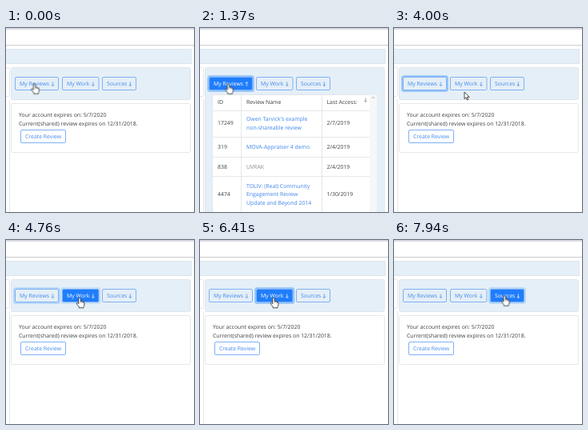
Recreate the animation shown at these times as an HTML page. Size 235 px wide and 230 px high, loop 8 s.

```html
<!DOCTYPE html>
<html lang="en">
<head>
<meta charset="utf-8">
<title>Review list</title>
<style>
@property --on { syntax: "<number>"; inherits: true; initial-value: 0; }
@property --ring { syntax: "<number>"; inherits: true; initial-value: 0; }

html, body { margin: 0; height: 100%; overflow: hidden; background: #fff; }
svg { display: block; width: 100vw; height: 100vh; }
text {
  font: 6.9px "Open Sans", "Noto Sans", sans-serif;
  text-rendering: geometricPrecision;
  fill: #3c4045;
  white-space: pre;
}
.blue text, text.link { fill: #3e84ea; }
.head text { font-size: 5.7px; font-weight: 700; }
text.muted { fill: #858a90; }
.panel { fill: #e5eff7; stroke: #dde6ed; }
.card { fill: #fff; stroke: #e6e7ea; }
.rule { stroke: #e4e7ea; fill: none; }
.tasks .rule { stroke: #dae3ea; }

/* Buttons: --on is the hover fill, --ring the focus glow */
.btn { --blue: #4389ed; color: color-mix(in srgb, #fff calc(var(--on) * 100%), var(--blue)); }
.btn text { fill: currentColor; }
.btn .glow { fill: none; stroke: #8fc1fa; stroke-width: 1.8; stroke-opacity: var(--ring); }
.btn .face { fill: #1f7dfc; fill-opacity: var(--on); stroke: #7fb1f4; }
.arrow { fill: none; stroke: currentColor; stroke-width: .8; }

.btn, .arrow, .scene, .cursor, .cursor g { animation: 8s step-end infinite; }
.reviews { animation-name: hover1, ring1; }
.work { animation-name: hover2, ring2; }
.sources { animation-name: hover3, ring3; }
.reviews .arrow { animation-name: flip1; }
.work .arrow { animation-name: flip2; }
.closed { animation-name: closed; }
.list { opacity: 0; animation-name: list; }
.tasks { opacity: 0; animation-name: tasks; }
.cursor { animation-name: move; }
.cursor .hand { animation-name: hand; }
.cursor .pointer { opacity: 0; animation-name: pointer; }

@keyframes hover1 {
  0% { --on: 0 } .75% { --on: .4 } 1.5% { --on: .8 } 2.25% { --on: 1 }
  48.5% { --on: .6 } 49.25% { --on: .2 } 50%, 100% { --on: 0 }
}
@keyframes hover2 {
  0% { --on: 0 } 51.5% { --on: .4 } 52.25% { --on: .8 } 53% { --on: 1 }
  88.125% { --on: .6 } 88.875% { --on: .2 } 89.625%, 100% { --on: 0 }
}
@keyframes hover3 {
  0% { --on: 0 } 88.875% { --on: .4 } 89.625% { --on: .8 } 90.375%, 100% { --on: 1 }
}
@keyframes ring1 {
  0% { --ring: 0 } 14.75% { --ring: .4 } 15.5% { --ring: 1 }
  59.5% { --ring: .6 } 60.25% { --ring: .2 } 61%, 100% { --ring: 0 }
}
@keyframes ring2 {
  0% { --ring: 0 } 59.5% { --ring: .4 } 60.25% { --ring: .8 } 61% { --ring: 1 }
  98.5% { --ring: .5 } 99.25%, 100% { --ring: 0 }
}
@keyframes ring3 {
  0% { --ring: 0 } 98.5% { --ring: .3 } 99.25%, 100% { --ring: .6 }
}
@keyframes flip1 { 0%, 38.75%, 100% { transform: none } 17.125% { transform: scaleY(-1) } }
@keyframes flip2 { 0%, 80.125%, 100% { transform: none } 61% { transform: scaleY(-1) } }
@keyframes closed { 0%, 38.75%, 80.125%, 100% { opacity: 1 } 17.125%, 61% { opacity: 0 } }
@keyframes list { 0%, 38.75%, 100% { opacity: 0 } 17.125% { opacity: 1 } }
@keyframes tasks { 0%, 80.125%, 100% { opacity: 0 } 61% { opacity: 1 } }
@keyframes hand { 0%, 51.5%, 88.875%, 100% { opacity: 1 } 48.5%, 88.125% { opacity: 0 } }
@keyframes pointer { 0%, 51.5%, 88.875%, 100% { opacity: 0 } 48.5%, 88.125% { opacity: 1 } }
@keyframes move {
  0% { transform: translate(35.5px, 69.5px) }
  47% { transform: translate(38px, 70px) }
  47.75% { transform: translate(49px, 72px) }
  48.5% { transform: translate(70px, 77px) }
  49.25% { transform: translate(82px, 80px) }
  50% { transform: translate(88px, 80px) }
  50.75% { transform: translate(91px, 79px) }
  51.5% { transform: translate(92px, 76px) }
  52.25% { transform: translate(92px, 74px) }
  53% { transform: translate(92px, 73px) }
  53.75% { transform: translate(92px, 72px) }
  85.125% { transform: translate(93px, 72px) }
  85.875% { transform: translate(96px, 73px) }
  86.625% { transform: translate(101px, 73px) }
  87.375% { transform: translate(109px, 73px) }
  88.125% { transform: translate(118px, 73px) }
  88.875% { transform: translate(126px, 73px) }
  89.625% { transform: translate(132px, 72px) }
  90.375% { transform: translate(136px, 71px) }
  91.125% { transform: translate(138px, 70px) }
  91.875%, 100% { transform: translate(138.2px, 69.5px) }
}
</style>
</head>
<body>
<svg viewBox="0 0 235 230">
  <defs>
    <path id="down" d="M0-2.6V2.4M-1.5 .9L0 2.4L1.5 .9"/>
    <g id="account">
      <rect class="card" x="6.5" y="94.5" width="224" height="61" rx="2"/>
      <text x="16" y="111">Your account expires on: 5/7/2020</text>
      <text x="16" y="121.8">Current(shared) review expires on 12/31/2018.</text>
      <g class="btn">
        <rect class="face" x="18.5" y="127.5" width="56" height="16" rx="1.5"/>
        <text x="24" y="138">Create Review</text>
      </g>
    </g>
  </defs>

  <rect width="235" height="230" fill="#fff"/>
  <rect width="235" height="2" fill="#d9d9e3"/>
  <path d="M0 21.5H235" stroke="#cdcdd0"/>
  <rect class="panel" x="-2.5" y="26.5" width="234" height="18"/>
  <path class="rule" d="M0 49.5H3.5Q4.5 49.5 4.5 51V84Q4.5 85.5 3.5 85.5H0M4.5 89V230"/>

  <g class="scene closed">
    <rect class="panel" x="6.5" y="49.5" width="224" height="40" rx="2"/>
    <use href="#account"/>
  </g>

  <g class="scene list">
    <rect class="panel" x="6.5" y="49.5" width="224" height="190" rx="2"/>
    <rect x="15" y="83" width="206" height="147" fill="#fff"/>
    <rect x="212" y="83" width="9" height="147" fill="#f6f7f8"/>
    <path d="M214.8 88L216.5 86.2L218.2 88" fill="none" stroke="#c98b62" stroke-width=".8"/>
    <path class="rule" d="M15 83.5H212M15 103.5H212M15 136.5H212M15 161.5H212M15 185.5H212M15.5 83V230M51.5 83V230M152.5 83V230"/>
    <text x="22" y="95.4">ID</text>
    <text x="58" y="95.4">Review Name</text>
    <text x="158.5" y="95.4">Last Access:</text>
    <use href="#down" x="207" y="90" fill="none" stroke="#6a7077" stroke-width=".7"/>
    <text x="22" y="121.4">17249</text>
    <text class="link" x="58" y="116.4">Owen Tarvick's example</text>
    <text class="link" x="58" y="127">non-shareable review</text>
    <text x="158.5" y="121.4">2/7/2019</text>
    <text x="22" y="150.6">319</text>
    <text class="link" x="58" y="150.6">MOVA-Appraiser 4 demo</text>
    <text x="158.5" y="150.6">2/4/2019</text>
    <text x="22" y="175.6">838</text>
    <text class="muted" x="58" y="175.6">UVRAK</text>
    <text x="158.5" y="175.6">2/4/2019</text>
    <text x="22" y="210.4">4474</text>
    <g class="blue">
      <text x="58" y="199.8">TOLIV: (Real) Community</text>
      <text x="58" y="210.4">Engagement Review</text>
      <text x="58" y="221">Update and Beyond 2014</text>
    </g>
    <text x="158.5" y="210.4">1/30/2019</text>
  </g>

  <g class="scene tasks">
    <rect class="panel" x="6.5" y="49.5" width="224" height="161" rx="2"/>
    <path class="rule" d="M15 83.5H221M15 104.5H221M15 147.5H221"/>
    <g class="head">
      <text x="21.5" y="96.2">Codes to apply</text>
      <text x="74" y="96.2">Group</text>
      <text x="116.5" y="96.2">Allocated</text>
      <text x="153.5" y="96.2">Started</text>
      <text x="185" y="96.2">Remaining</text>
    </g>
    <text x="21.5" y="117">Screen on</text>
    <text x="21.5" y="127.6">title &amp;</text>
    <text x="21.5" y="138.2">abstract</text>
    <text x="74" y="117">Group 1</text>
    <text x="74" y="127.6">T&amp;A</text>
    <text x="21.5" y="160">Screen on</text>
    <text x="21.5" y="170.6">full report</text>
    <text x="74" y="160">Group 1</text>
    <text x="74" y="170.6">full</text>
    <text x="74" y="181.2">report</text>
    <g class="blue">
      <text x="122.5" y="120">20</text>
      <text x="159.5" y="120">20</text>
      <text x="191.5" y="120">0</text>
      <text x="122.5" y="163">8</text>
      <text x="159.5" y="163">8</text>
      <text x="191.5" y="163">0</text>
    </g>
    <use href="#account" y="121"/>
  </g>

  <g class="btn reviews">
    <rect class="glow" x="10.1" y="60.1" width="56.8" height="18.8" rx="2.5"/>
    <rect class="face" x="11.5" y="61.5" width="54" height="16" rx="1.5"/>
    <text x="17" y="72.4">My Reviews</text>
    <g transform="translate(58.4 70)"><use class="arrow" href="#down"/></g>
  </g>
  <g class="btn work">
    <rect class="glow" x="69.1" y="60.1" width="48.3" height="18.8" rx="2.5"/>
    <rect class="face" x="70.5" y="61.5" width="45.5" height="16" rx="1.5"/>
    <text x="76" y="72.4">My Work</text>
    <g transform="translate(108.8 70)"><use class="arrow" href="#down"/></g>
  </g>
  <g class="btn sources">
    <rect class="glow" x="119.1" y="60.1" width="44.8" height="18.8" rx="2.5"/>
    <rect class="face" x="120.5" y="61.5" width="42" height="16" rx="1.5"/>
    <text x="126" y="72.4">Sources</text>
    <g transform="translate(155.3 70)"><use class="arrow" href="#down"/></g>
  </g>

  <g class="cursor" fill="#fff" stroke="#222" stroke-width=".8" stroke-linejoin="round">
    <g class="hand">
      <path d="M-1.2 .8Q0-.8 1.2 .8V4.4Q2.6 3.7 3 4.9Q4.2 4.4 4.6 5.5Q5.9 5.2 5.9 6.6V9Q5.9 10.6 5 11.4V12.8H-.8V11.6Q-2.2 9.8-3.6 7.8Q-4 6.4-2.6 6.5L-1.2 7.8Z"/>
      <path d="M1.2 4.4V6.6M3 4.9V6.8M4.6 5.5V7" fill="none" stroke-width=".5"/>
    </g>
    <g class="pointer">
      <path d="M0 0V8.6L2 6.8L3.3 10L4.8 9.4L3.4 6.3H6.2Z"/>
    </g>
  </g>
</svg>
</body>
</html>
```
